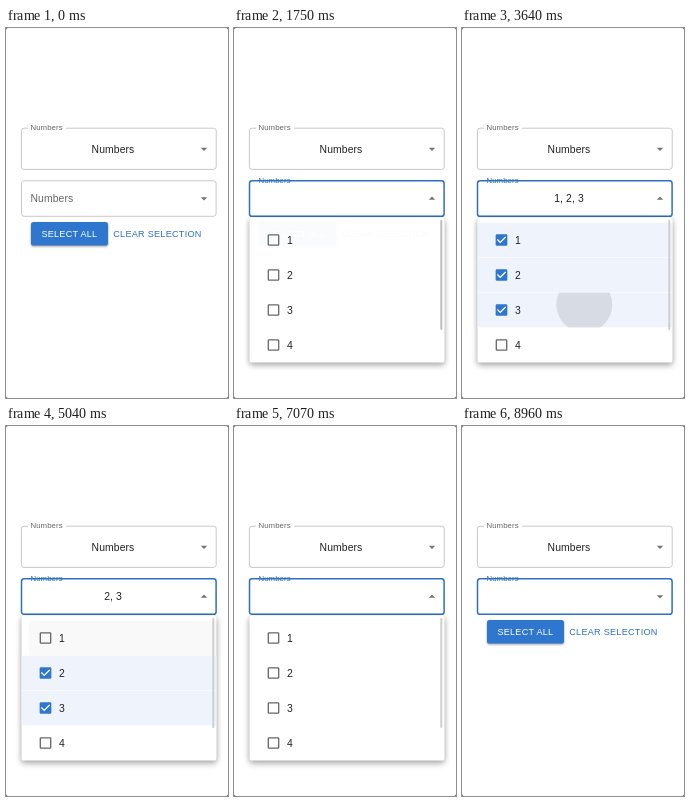
An HTML page for the animation above (9.87 s loop, 222 by 370 pixels).

```html
<!DOCTYPE html>
<html lang="en">
<head>
<meta charset="utf-8">
<title>Multiple select</title>
<style>
  html, body { margin: 0; width: 100%; height: 100%; overflow: hidden; background: #444; }
  svg { display: block; width: 222px; height: 370px; }
  text { font: 10.4px "Liberation Sans", Arial, sans-serif; letter-spacing: .0094em; fill: #212121; }
  .middle { text-anchor: middle; }
  .small { font-size: 7.8px; fill: #666; }
  .button { font-size: 9.1px; letter-spacing: .0286em; fill: #2f70bd; }
  .outline { fill: none; stroke: #c8c8c8; }
  .arrow { fill: #757575; }
  #contained { fill: #2f76cf; filter: drop-shadow(0 1px 1.2px rgba(0,0,0,.4)); }
  #paper { fill: #fff; filter: drop-shadow(0 3px 3px rgba(0,0,0,.22)) drop-shadow(0 1px 2.5px rgba(0,0,0,.2)); }
</style>
</head>
<body>
<svg viewBox="0 0 222 370">
  <defs>
    <path id="triangle" d="M-3.25-1.3h6.5L0 1.95z"/>
  </defs>
  <rect width="222" height="370" rx="2" fill="#fff"/>

  <path class="outline" d="M22 100.2H18a2.6 2.6 0 0 0-2.6 2.6v36a2.6 2.6 0 0 0 2.6 2.6h189.600a2.6 2.6 0 0 0 2.6-2.6v-36a2.6 2.6 0 0 0-2.6-2.6H60"/>
  <text class="small" x="24.5" y="102.2">Numbers</text>
  <text class="middle" x="107" y="124.800">Numbers</text>
  <use class="arrow" href="#triangle" x="198" y="121"/>

  <rect id="field" class="outline" x="15.500" y="152.800" width="194.600" height="35.500" rx="2.6"/>
  <text id="label">Numbers</text>
  <text id="value" class="middle" x="107" y="174.300"></text>
  <use id="arrow" class="arrow" href="#triangle"/>

  <rect id="contained" x="25" y="194" width="77" height="23.600" rx="2.6"/>
  <text class="button" x="35.400" y="209.200" style="fill:#fff">SELECT ALL</text>
  <text class="button" x="107.300" y="209.200">CLEAR SELECTION</text>

  <g id="menu">
    <rect id="paper" x="15.500" y="189.500" width="195" height="145" rx="2.6"/>
    <g id="rows"></g>
    <rect id="scrollbar" x="206.300" y="192" width="2" height="110" rx="1"/>
  </g>
</svg>
<script>
const LOOP = 9870, OPEN = 1540, CLOSE = 8715, GROW = 260, SHRINK = 240;
const RIPPLE = 550, RIPPLE_RADIUS = 111, ROW = 35, TOP = 194.5;
// [time, row index]: each tap toggles its row
const TAPS = [[2450, 0], [2940, 1], [3500, 2], [4690, 0], [5460, 1], [6510, 2]];

const $ = id => document.getElementById(id);
const set = (el, attrs) => { for (const k in attrs) el.setAttribute(k, attrs[k]); };
const clamp = p => Math.min(1, Math.max(0, p));

// cubic-bezier(x1, 0, .2, 1)
const bezier = x1 => p => {
  p = clamp(p);
  let lo = 0, hi = 1, s = p;
  for (let i = 0; i < 24; i++) {
    s = (lo + hi) / 2;
    const x = 3 * (1 - s) ** 2 * s * x1 + 3 * (1 - s) * s * s * .2 + s ** 3;
    if (x < p) lo = s; else hi = s;
  }
  return p === 0 || p === 1 ? p : 3 * (1 - s) * s * s + s ** 3;
};
const easeInOut = bezier(.4), easeOut = bezier(0);

$('rows').innerHTML = [0, 1, 2, 3].map(i => {
  const y = TOP + i * ROW;
  return `<svg x="15.5" y="${y}" width="195" height="${ROW}">
    <rect class="tint" width="195" height="${ROW}" fill="#eef3fc"/>
    <g transform="translate(16.2 9.7) scale(.65)">
      <rect class="empty" x="4" y="4" width="16" height="16" rx="1" fill="none" stroke="#666" stroke-width="2"/>
      <g class="full"><rect x="3" y="3" width="18" height="18" rx="2" fill="#2f76cf"/>
      <path d="M5.7 11.300l4.300 4.300 8.300-8.300" fill="none" stroke="#fff" stroke-width="2"/></g>
    </g>
    <text x="37.6" y="21.2">${i + 1}</text>
    <circle class="ripple" cx="106.800" cy="${i === 2 ? 12 : 17.5}" fill="#000"/>
  </svg>`;
}).join('');
const rows = [...$('rows').children].map(el => ({
  tint: el.querySelector('.tint'), empty: el.querySelector('.empty'),
  full: el.querySelector('.full'), ripple: el.querySelector('.ripple'),
}));

function drawRow(row, i, t) {
  const taps = TAPS.filter(([at, r]) => r === i && at <= t);
  const checked = taps.length % 2 === 1;
  const age = taps.length ? t - taps[taps.length - 1][0] : Infinity;
  const tint = easeInOut(age / 150), spread = easeInOut(age / RIPPLE);
  set(row.tint, { opacity: checked ? tint : 1 - tint });
  if (!taps.length) set(row.tint, { opacity: 0 });
  set(row.empty, { opacity: checked ? 0 : 1 });
  set(row.full, { opacity: checked ? 1 : 0 });
  set(row.ripple, { r: RIPPLE_RADIUS * spread, opacity: .87 * (.1 + .2 * spread) * (1 - spread) });
  return checked;
}

function drawMenu(t) {
  const closing = t >= CLOSE;
  const length = closing ? SHRINK : GROW;
  const age = t - (closing ? CLOSE : OPEN);
  const fade = easeInOut(age / length);
  const delay = closing ? length / 3 : 0;
  const move = easeInOut((age - delay) / (length * .666));
  const size = closing ? 1 - move : move;
  set($('menu'), {
    opacity: closing ? 1 - fade : fade,
    transform: `translate(113 189.5) scale(${.75 + .25 * size} ${.5625 + .4375 * size}) translate(-113 -189.5)`,
  });
  set($('scrollbar'), { fill: t < 2100 ? '#bdbdbd' : '#cfcfcf' });
}

function drawField(t) {
  const focused = t >= OPEN, open = focused && t < CLOSE + 30;
  const lift = easeOut((t - OPEN) / 200);
  $('field').style.stroke = focused ? '#2f70bd' : '';
  $('field').style.strokeWidth = focused ? 1.5 : 1;
  $('label').style.fill = focused ? '#2f70bd' : '#666';
  set($('label'), { transform: `translate(24.5 ${174.3 - 19 * lift}) scale(${1 - .25 * lift})` });
  set($('arrow'), { transform: `translate(198 170.5) rotate(${open ? 180 : 0})` });
}

function frame(now) {
  const t = (now - start) % LOOP;
  drawField(t);
  drawMenu(t);
  $('value').textContent = rows
    .map((row, i) => drawRow(row, i, t) ? i + 1 : 0).filter(Boolean).join(', ');
  requestAnimationFrame(() => frame(performance.now()));
}
const start = performance.now();
frame(start);
</script>
</body>
</html>
```
